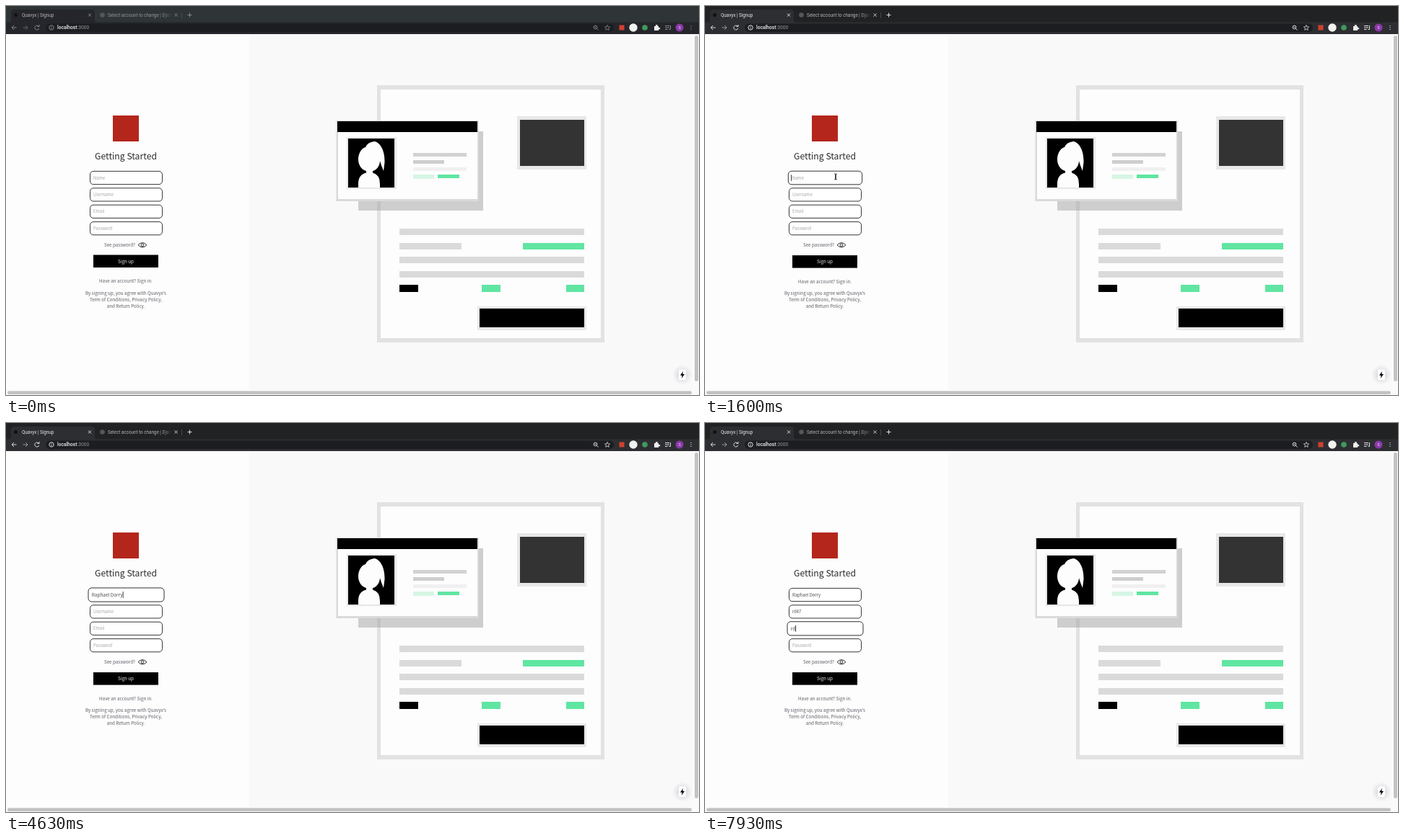
Animation of 960 by 540 pixels, one loop 8000 ms. Source, as an HTML page:

```html
<!DOCTYPE html>
<html lang="en">
<head>
<meta charset="utf-8">
<title>Sign-up form</title>
<style>
html, body { margin: 0; width: 100%; height: 100%; overflow: hidden; background: #fdfdfd; }
svg { display: block; width: 960px; height: 540px; }
text { white-space: pre; }
.page { font-family: "Noto Sans CJK JP", "Noto Sans CJK SC", "Noto Sans CJK", "Noto Sans", sans-serif; font-weight: 300; font-size: 6.25px; }
.page text { fill: #5c5c66; }
.page .title { fill: #2c2c2c; }
.page .label { fill: #eee; }
.mid { text-anchor: middle; }
.ui { font-family: Roboto, Inter, sans-serif; font-size: 6.3px; }
.line { fill: none; stroke-width: 1; }
.strip { fill: #2f3537; }
.bar { fill: #25262b; }
.pill { fill: #1c1d20; }
.tab, .dim { fill: #b4b5b8; }
.dim { opacity: .75; }
.icons { stroke: #85868a; fill: none; }
.active .strip { fill: #202224; }
.active .bar { fill: #2d2e32; }
.active .tab { fill: #e8e9eb; }
.active .dim { opacity: 1; }
.active .icons { stroke: #dcdde0; }
</style>
</head>
<body>
<svg viewBox="0 0 960 540">
  <defs>
    <linearGradient id="fade"><stop offset=".85" stop-color="#fff"/><stop offset="1" stop-color="#000"/></linearGradient>
    <mask id="clipTitle"><rect x="140" y="5" width="90" height="16" fill="url(#fade)"/></mask>
    <radialGradient id="glow"><stop offset=".3" stop-color="#dcdce0"/><stop offset="1" stop-color="#dcdce0" stop-opacity="0"/></radialGradient>
  </defs>

  <rect width="960" height="540" fill="#fdfdfd"/>
  <rect x="337" y="39" width="615" height="494" fill="#f9f9fa"/>

  <g id="browser" class="ui">
    <rect class="strip" width="960" height="24"/>
    <path class="bar" d="M0 39V22.500H4Q7 22.500 7 19V9Q7 5 11 5H119Q123 5 123 9V19Q123 22.500 126 22.500H960V39Z"/>
    <rect class="pill" x="55" y="24.500" width="787" height="11.500" rx="5.700"/>
    <circle cx="13.500" cy="12.500" r="2.500" fill="#111"/>
    <circle cx="133.500" cy="12.500" r="3.300" fill="#55575a"/>
    <text class="tab" x="22" y="14.800">Quavyx | Signup</text>
    <g mask="url(#clipTitle)"><text class="dim" x="141" y="14.800">Select account to change | Django</text></g>
    <path stroke="#55585b" stroke-width=".7" d="M243.500 9V17"/>
    <g class="icons">
      <path d="M114 10.500l4 4m0-4l-4 4M233.500 10.500l4 4m0-4l-4 4M251.500 12.500h6m-3-3v6"/>
      <path d="M14.500 30H8m3-3l-3 3 3 3"/>
      <path d="M23.500 30H30m-3-3l3 3-3 3" opacity=".6"/>
      <path d="M45 28a3 3 0 1 0 .7 3M46 26v2.500h-2.500"/>
      <circle cx="63" cy="30" r="3.200"/><path d="M63 29.500v2.300M63 27.700v.9"/>
      <circle cx="816.500" cy="29.500" r="2.400"/><path d="M818.300 31.300l2.200 2.200M815.500 29.500h2"/>
      <path d="M833 26.500l1 2.400 2.600.2-2 1.700.6 2.600-2.200-1.400-2.200 1.400.6-2.600-2-1.700 2.600-.2z" stroke-width=".8"/>
      <path d="M913 27.500h6M913 30h6M913 32.500h3.500M920.500 27v5.500h-2"/>
      <path d="M949 27v1M949 29.500v1M949 32v1" stroke-width="1.200"/>
    </g>
    <text x="71" y="32.300" font-size="6.700" fill="#f0f0f2"><tspan font-weight="500">localhost</tspan><tspan fill="#96979b">:3000</tspan></text>
    <rect x="849.500" y="26.500" width="7" height="7" fill="#d2402f"/>
    <circle cx="869" cy="30" r="5.700" fill="#f2f2f0"/>
    <circle cx="885" cy="30" r="3.800" fill="#3f9b5c"/>
    <path d="M898 28h2a1.400 1.400 0 1 1 2.600 0h1.400v2a1.400 1.400 0 1 1 0 2.300v1.700h-6z" fill="#eee"/>
    <circle cx="933" cy="30" r="5.500" fill="#8b38a8"/>
    <text class="mid" x="933" y="32.200" font-size="6" fill="#ecdcf4">S</text>
  </g>

  <g id="art"></g>

  <rect x="148" y="152" width="36" height="36" fill="#b4261c"/>
  <text class="page mid" x="166" y="213" style="font-size:12.200px" fill="#2c2c2c">Getting Started</text>
  <g id="fields" class="page"></g>
  <g class="page mid">
    <text x="157.500" y="334.400">See password?</text>
    <path class="line" stroke="#333" d="M183 331.800q6-6.400 12 0q-6 6.400-12 0z"/>
    <circle class="line" cx="189" cy="331.800" r="1.900" stroke="#333"/>
    <g id="lower">
      <rect x="121" y="345.500" width="90" height="17.500"/>
      <text class="label" x="166" y="356.500">Sign up</text>
      <text x="166" y="384">Have an account? Sign in.</text>
    </g>
    <text x="166" y="400.500">By signing up, you agree with Quavyx's</text>
    <text x="166" y="409.500">Term of Conditions, Privacy Policy,</text>
    <text x="166" y="418.500">and Return Policy.</text>
  </g>

  <circle cx="937" cy="512" r="14" fill="url(#glow)"/>
  <rect x="932" y="504.500" width="10" height="14.500" rx="2.500" fill="#fff"/>
  <path d="M938 507l-4 5.800h2.600l-.8 4.200 4.200-6h-2.700z"/>
  <rect x="952" y="39" width="8" height="501" fill="#fafafa"/>
  <rect y="533" width="952" height="7" fill="#fafafa"/>
  <rect x="954" y="41" width="5" height="480" rx="2.500" fill="#c3c3c3"/>
  <rect x="2" y="534.500" width="948" height="4.500" rx="2.200" fill="#c1c1c1"/>

  <path id="arrow" d="M0 0V7.200L1.700 5.700 2.800 8.200 4 7.700 2.900 5.200H5z" stroke="#fff" stroke-width=".5"/>
  <path id="beam" class="line" stroke="#111" stroke-width=".9" d="M-1.700-4Q0-4 0-3V3Q0 4-1.700 4M1.700-4Q0-4 0-3V3Q0 4 1.700 4"/>
</svg>

<script>
const LOOP = 8000, CLICK = 1530, FADE = 150;
const $ = id => document.getElementById(id);
const clamp = v => Math.max(0, Math.min(1, v));
const ease = v => v * v * (3 - 2 * v);

function add(parent, tag, attrs, text = '') {
  const el = document.createElementNS('http://www.w3.org/2000/svg', tag);
  for (const key in attrs) el.setAttribute(key, attrs[key]);
  el.textContent = text;
  return parent.appendChild(el);
}

// Illustration: boxes given by their left, top, right and bottom edges
const box = (x, y, right, bottom, fill) =>
  add($('art'), 'rect', { x, y, width: right - x, height: bottom - y, fill });
const grey = '#dadada', pale = '#e8e8e8', white = '#fdfdfd', green = '#60e5a2', black = '#000';

box(514, 110, 829, 467, '#e2e2e2');
box(519, 116, 824, 461, white);
box(708, 153, 804, 227, pale);
box(712, 158, 801, 222, '#333');
box(488, 174, 661, 284, '#cecece');
box(514, 174, 519, 284, '#c2c2c4');
box(457.5, 159, 655, 271, '#dadada');
box(460, 175, 653, 268, white);
box(459, 160, 653, 175, black);
box(472, 182, 541, 254, '#e6e6e6');
box(474, 184, 538, 252, black);
add($('art'), 'path', {
  fill: white,
  d: 'M488 213C488 204 493 197 498 196Q501 189 510 188C519 189 525 202 524.500 217L523 229Q520 222 518 215C518 222 513 228 508 229V231.500Q518 234 518 247V252H488V247Q488 234 499 231.500V229C492 227 488 220 488 213Z'
});
box(564, 204, 638, 209, '#d2d2d2');
box(564, 214, 607, 219, '#cecece');
box(564, 224, 638, 229, '#f0f0f0');
box(564, 234, 593, 240, '#d6f6e4');
box(598, 234, 628, 239, green);
for (const y of [309, 348, 368]) box(545, y, 801, y + 9, grey);
box(545, 329, 631, 338, grey);
box(716, 329, 801, 338, green);
box(545, 387, 571, 397, black);
box(659, 387, 685, 397, green);
box(776, 387, 801, 397, green);
box(653, 417, 804, 450, pale);
box(656, 420, 801, 446, black);

// Form: each key time reveals one more letter
const fields = [
  { label: 'Name', value: 'Raphael Dorry', focus: CLICK, blur: 4970,
    keys: [2470, 2830, 3130, 3370, 3530, 3660, 3770, 3880, 4000, 4170, 4330, 4470, 4600] },
  { label: 'Username', value: 'rd47', focus: 4970, blur: 7130, keys: [6030, 6430, 6870, 6970] },
  { label: 'Email', value: 'rd', focus: 7130, blur: LOOP, keys: [7650, 7900] },
  { label: 'Password', value: '', focus: LOOP, blur: LOOP, keys: [] }
];

fields.forEach((f, i) => {
  f.y = 238.5 + 23.4 * i;
  f.group = add($('fields'), 'g', {});
  add(f.group, 'rect', { x: -50, y: -9.1, width: 100, height: 18.2, rx: 4.5, fill: '#fff', stroke: '#222', 'stroke-width': 0.9 });
  f.text = add(f.group, 'text', { x: -45.5, y: 2.1 });
  f.caret = add(f.group, 'rect', { y: -4.3, width: 0.7, height: 8.6 });
});

function drawField(f, t) {
  const k = ease(clamp((t - f.focus) / FADE)) - ease(clamp((t - f.blur) / FADE));
  const typed = f.keys.filter(time => time <= t);
  const last = typed.length ? typed[typed.length - 1] : f.focus;
  const focused = t >= f.focus && t < f.blur;

  f.group.setAttribute('transform', `translate(166.500 ${f.y}) scale(${1 + 0.05 * k})`);
  f.text.style.fontSize = 5.85 + 0.28 * k + 'px';
  f.text.style.fill = typed.length ? '#4a4a4a' : '#a4a4a4';
  f.text.textContent = typed.length ? f.value.slice(0, typed.length) : f.label;
  const end = typed.length ? f.text.getComputedTextLength() : -0.8;
  f.caret.setAttribute('x', -45.3 + end);
  f.caret.style.display = focused && Math.floor((t - last) / 500) % 2 === 0 ? '' : 'none';
}

function place(el, x, y, shown) {
  el.setAttribute('transform', `translate(${x} ${y})`);
  el.style.display = shown ? '' : 'none';
}

function draw(t) {
  const clicked = t >= CLICK;
  $('browser').classList.toggle('active', clicked);
  $('lower').setAttribute('transform', `translate(0 ${clicked ? 0.6 : 0})`);
  fields.forEach(f => drawField(f, t));

  const away = 1 - ease(clamp((t - 30) / 1000));
  const drift = ease(clamp((t - 1100) / 400));
  place($('arrow'), 183.5 + 150 * away - 2.5 * drift, 236.5 - 250 * away, !clicked);
  place($('beam'), 181, 237, clicked && t < fields[0].keys[0]);
}

function frame() {
  draw(performance.now() % LOOP);
  requestAnimationFrame(frame);
}
frame();
</script>
</body>
</html>
```
